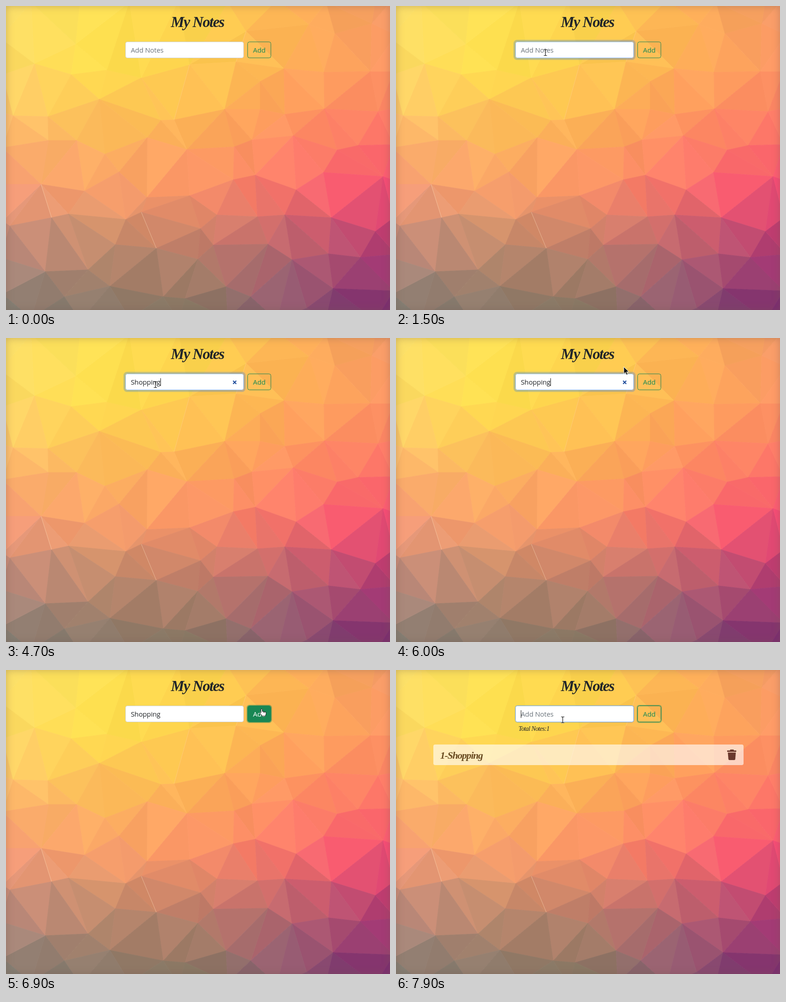
These frames come from a looping animation (843x665 px, 8000 ms). An HTML page with a canvas:

```html
<!DOCTYPE html>
<html lang="en">
<head>
<meta charset="utf-8">
<title>My Notes</title>
<style>
  html, body { margin: 0; width: 100%; height: 100%; overflow: hidden; }
  canvas, svg, .edge { position: absolute; left: 0; top: 0; width: 843px; height: 665px; }
  .edge { box-shadow: inset 0 0 17px rgba(110, 85, 75, .36); }
  .ui { font: 15px "Open Sans", "Noto Sans", sans-serif; letter-spacing: -.15px; fill: #212529; }
  .script { font-family: "Liberation Serif", serif; font-style: italic; fill: #212529; }
  .title { font-size: 33px; font-weight: bold; letter-spacing: -1.6px; }
  .total { font-size: 14px; letter-spacing: -.6px; }
  .item { font-size: 22px; font-weight: bold; letter-spacing: -1.2px; }
</style>
</head>
<body>
<canvas id="bg" width="843" height="665"></canvas>
<div class="edge"></div>
<svg viewBox="0 0 843 665">
  <text class="script title" x="362" y="46">My Notes</text>

  <rect id="inputRing" fill="none" stroke="#0d6efd" stroke-opacity=".25"/>
  <rect id="input" x="262.5" y="78.5" width="259" height="35" rx="4" fill="#fff"/>
  <text id="hint" class="ui" x="274" y="102" style="fill:#6c757d">Add Notes</text>
  <text id="value" class="ui" x="274" y="102"></text>
  <rect id="caret" y="88" width="1" height="17" fill="#111"/>
  <path id="clear" d="M498.5 93.5l7 7m0-7l-7 7" stroke="#1f4e9c" stroke-width="2.2"/>

  <rect id="buttonRing" fill="none" stroke="#198754" stroke-opacity=".5"/>
  <rect id="button" x="530.5" y="78.5" width="51" height="35" rx="4" fill="#198754" stroke="#198754"/>
  <text id="label" class="ui" x="542.3" y="102">Add</text>

  <g id="notes">
    <text class="script total" x="269" y="132.5">Total Notes:1</text>
    <g opacity=".62">
      <rect x="82" y="163" width="681" height="45" rx="4" fill="#fff"/>
    </g>
    <text class="script item" x="97" y="194" style="fill:#694b21">1-Shopping</text>
    <path d="M727 176h6l1-2h7l1 2h5v3h-20zM728.5 180.5h17.500l-1.200 14.500q-.2 2-2.200 2h-10.700q-2 0-2.200-2z" fill="#6b392d"/>
  </g>

  <g id="arrow"><path d="M0 0v15.500l3.600-3.400 2.500 5.700 2.700-1.200-2.500-5.500h5z" fill="#111" stroke="#fff"/></g>
  <g id="beam" fill="none">
    <path d="M-3.500-6.500h2.500l1 1 1-1h2.500M0-5.500v11M-3.500 6.500h2.500l1-1 1 1h2.500" stroke="#fff" stroke-opacity=".6" stroke-width="2.4"/>
    <path d="M-3.500-6.500h2.500l1 1 1-1h2.500M0-5.500v11M-3.500 6.500h2.500l1-1 1 1h2.500" stroke="#111" stroke-width="1.200"/>
  </g>
  <g id="hand">
    <path d="M2.700 1.800q1.500-1.700 3 .2v4.500l6.200 1.200q2.400.5 2.200 2.600l-.7 3.600-1.200 2.800h-6.500l-4.800-6q-1-1.800.7-2.200l1.400 1z" fill="#fff" stroke="#111" stroke-linejoin="round"/>
    <path d="M8 7.500v2.500M10.500 8v2.200" stroke="#111" stroke-width=".8"/>
  </g>
</svg>
<script>
const $ = id => document.getElementById(id);
const W = 843, H = 665, LOOP = 8000;

// ---------- low-poly backdrop ----------
const coords = [
  153,83, 527,55, 665,40, 722,60, 803,38,
  62,126, 143,150, 222,140, 297,157, 403,128, 505,122, 610,137, 698,145, 800,143,
  558,165, 15,240, 92,242, 205,204, 340,250, 369,249, 480,226, 558,226, 612,237, 699,225, 817,231,
  93,294, 155,294, 310,288, 217,324, 397,314, 501,308, 540,293, 630,284, 727,315, 773,305,
  77,390, 172,405, 248,363, 309,419, 403,415, 499,380, 547,370, 637,402, 697,364, 828,373,
  8,481, 100,463, 137,455, 263,467, 297,451, 427,487, 463,457, 552,461, 612,457, 714,463, 811,493,
  86,581, 180,577, 240,522, 330,530, 421,554, 455,523, 575,521, 628,555, 708,542, 778,550,
  128,636, 228,613, 345,636, 393,640, 483,614, 537,636, 660,661, 718,618
];
const palette = [
  "fde26c fde154 fcd64e fdb056 f49a66",
  "fedb63 fede4b fece4e ffb058 fd9763",
  "ffbc6c ffc05c ffb25a ff9163 ff7a69",
  "fb9e78 f89e68 f98f66 f9706c fa4c74",
  "bf8b7c bf8b6e bd7d69 b9626e b03c74",
  "857f75 8d7a6a 887863 8b5672 7c2a70"
].map(row => row.split(" ").map(h => [0, 2, 4].map(i => parseInt(h.slice(i, i + 2), 16))));

function meshPoints() {
  const pts = [];
  for (let i = 0; i < coords.length; i += 2) pts.push([coords[i], coords[i + 1]]);
  for (let i = 0; i < 10; i++) {
    const out = 8 + i % 2 * 5;
    pts.push([-out, 80 * i - 10], [W + out, 80 * i - 17]);
    if (i < 8) pts.push([55 + 108 * i, -out], [55 + 108 * i, H + 10 + out]);
  }
  return pts;
}

function triangle(a, b, c) {
  const [ax, ay] = a, bx = b[0] - ax, by = b[1] - ay, cx = c[0] - ax, cy = c[1] - ay;
  const d = 2 * (bx * cy - by * cx), bb = bx * bx + by * by, cc = cx * cx + cy * cy;
  const x = (cy * bb - by * cc) / d, y = (bx * cc - cx * bb) / d;
  return { v: [a, b, c], x: x + ax, y: y + ay, r: x * x + y * y };
}

// Bowyer-Watson triangulation
function delaunay(pts) {
  const far = [[-9000, -8000], [9500, -8100], [400, 12000]];
  let tris = [triangle(...far)];
  for (const p of pts) {
    const rim = new Map();
    tris = tris.filter(t => {
      if ((p[0] - t.x) ** 2 + (p[1] - t.y) ** 2 >= t.r) return true;
      t.v.forEach((a, i) => {
        const b = t.v[(i + 1) % 3], key = [a, b].sort((m, n) => m[0] - n[0] || m[1] - n[1]).join();
        rim.has(key) ? rim.delete(key) : rim.set(key, [a, b]);
      });
      return false;
    });
    for (const [a, b] of rim.values()) tris.push(triangle(a, b, p));
  }
  return tris.map(t => t.v).filter(v => !v.some(p => far.includes(p)));
}

function shade(x, y) {
  const u = Math.min(3.999, Math.max(0, x / W * 4)), v = Math.min(4.999, Math.max(0, y / H * 5));
  const i = u | 0, j = v | 0, mix = (a, b, k) => a + (b - a) * k;
  const n = Math.sin(x * 12.99 + y * 78.23) * 43758.5, jitter = (n - Math.floor(n) - .5) * 9;
  const rgb = [0, 1, 2].map(c => Math.round(jitter + mix(
    mix(palette[j][i][c], palette[j][i + 1][c], u - i),
    mix(palette[j + 1][i][c], palette[j + 1][i + 1][c], u - i), v - j)));
  return `rgb(${rgb})`;
}

function paintBackdrop() {
  const g = $("bg").getContext("2d");
  g.lineWidth = .8;
  for (const v of delaunay(meshPoints())) {
    g.fillStyle = g.strokeStyle = shade((v[0][0] + v[1][0] + v[2][0]) / 3, (v[0][1] + v[1][1] + v[2][1]) / 3);
    g.beginPath();
    v.forEach(p => g.lineTo(...p));
    g.closePath();
    g.fill();
    g.stroke();
  }
  const seam = (x1, y1, x2, y2, alpha) => {
    g.strokeStyle = `rgba(255,225,190,${alpha})`;
    g.beginPath();
    g.moveTo(x1, y1);
    g.lineTo(x2, y2);
    g.stroke();
  };
  seam(77, 390, 100, 463, .6);
  seam(297, 451, 330, 530, .6);
  seam(403, 128, 369, 249, .35);
  seam(527, 55, 505, 122, .3);
}

// ---------- timeline: [start ms, value...] ----------
const typed = [[0, 0], [1900, 1], [2500, 2], [3200, 3], [3400, 4], [3600, 5], [4200, 6], [4600, 7], [4700, 8], [7000, 0]];
const caretOn = [[0, 0], [1000, 1], [1500, 0], [1900, 1], [3100, 0], [3200, 1], [5400, 0], [5900, 1], [6800, 0], [7900, 1]];
const inputGlow = [[0, 0], [900, 1.5], [1000, 3], [1100, 4], [6800, 1.5], [6900, 0], [7900, 1]];
const buttonGlow = [[0, 0], [6800, .7], [6900, 1.7], [7000, 4], [7900, 1.5]];
const hover = [[0, 0], [300, .6], [400, .4], [500, 0], [6400, .6], [6500, 1], [7300, .4], [7400, 0]];
const pointer = [
  [0, ""], [200, "arrow", 572, 30], [300, "hand", 556, 97], [400, "beam", 482, 106],
  [500, "beam", 402, 104], [600, "beam", 346, 102], [700, "beam", 328, 102],
  [5800, "beam", 356, 97], [5900, "arrow", 430, 70], [6000, "arrow", 500, 63],
  [6100, "arrow", 537, 38], [6200, "arrow", 555, 48], [6300, "arrow", 561, 59],
  [6400, "hand", 558, 80], [6500, "hand", 557, 84],
  [7200, "hand", 542, 93], [7300, "beam", 492, 111], [7400, "beam", 418, 111], [7500, "beam", 366, 109]
];
const at = (track, t) => track.filter(s => s[0] <= t).pop().slice(1);

const set = (id, attrs) => Object.entries(attrs).forEach(([k, v]) => $(id).setAttribute(k, v));
const show = (id, on) => { $(id).style.display = on ? "" : "none"; };

function ring(id, x, w, size) {
  show(id, size);
  set(id, { x: x - size / 2, y: 78 - size / 2, width: w + size, height: 36 + size, rx: 4 + size / 2, "stroke-width": size });
}

function render(t) {
  const [count] = at(typed, t), [glow] = at(inputGlow, t), [fill] = at(hover, t);
  const [kind, x, y] = at(pointer, t);
  $("value").textContent = "Shopping".slice(0, count);
  show("hint", !count);
  show("clear", count && t < 6800);
  show("caret", at(caretOn, t)[0]);
  set("caret", { x: Math.round(274 + (count ? $("value").getComputedTextLength() : 0)) });
  ring("inputRing", 262, 260, glow);
  set("input", { stroke: glow ? "#86b7fe" : "#ced4da" });
  ring("buttonRing", 530, 52, at(buttonGlow, t)[0]);
  set("button", { "fill-opacity": fill });
  $("label").style.fill = `color-mix(in srgb, #fff ${fill * 100}%, #198754)`;
  show("notes", t >= 7000);
  for (const id of ["arrow", "beam", "hand"]) show(id, id === kind);
  if (kind) set(kind, { transform: `translate(${x} ${y})` });
}

paintBackdrop();
const start = performance.now();
function tick() {
  render((performance.now() - start) % LOOP);
  requestAnimationFrame(tick);
}
tick();
</script>
</body>
</html>
```
